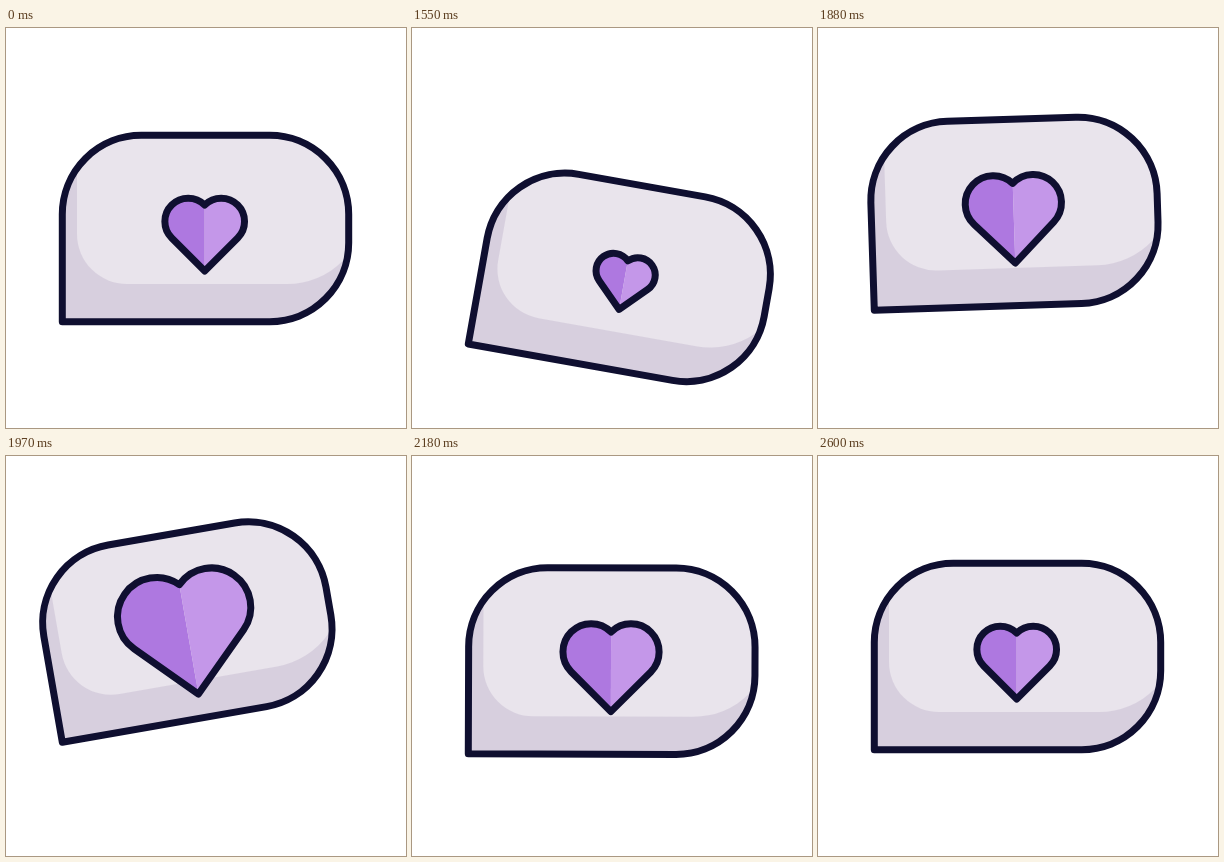
Animation, 400 px wide and 400 px high, one loop 2630 ms. Source, as an HTML page:

```html
<!DOCTYPE html>
<html lang="en">
<head>
<meta charset="utf-8">
<title>Heart message</title>
<style>
  html, body { margin: 0; width: 100%; height: 100%; overflow: hidden; background: #fff; }
  svg { display: block; width: 100vw; height: 100vh; }
  .line { fill: none; stroke: #0f0f30; stroke-width: 7; stroke-linejoin: round; }
</style>
</head>
<body>
<svg viewBox="0 0 400 400">
  <defs>
    <path id="shape" d="M56.3 293.7V186.3A79 79 0 0 1 135.3 107.3H263.7A79 79 0 0 1 342.7 186.3V214.7A79 79 0 0 1 263.7 293.7Z"/>
    <clipPath id="inside"><use href="#shape"/></clipPath>
  </defs>
  <g id="bubble">
    <use href="#shape" fill="#d7cfde"/>
    <path clip-path="url(#inside)" fill="#e9e4ec" d="M71 100V206A50 50 0 0 0 121 256H281A79 79 0 0 0 360 177V100Z"/>
    <use href="#shape" class="line"/>
    <g id="heart">
      <path fill="#ae78e0" d="M0 39L-33 6A23.3 23.3 0 0 1 0 -27Z"/>
      <path fill="#c497e9" d="M0 39L33 6A23.3 23.3 0 0 0 0 -27Z"/>
      <path id="outline" class="line" d="M0 39L-33 6A23.3 23.3 0 0 1 0 -27A23.3 23.3 0 0 1 33 6Z"/>
    </g>
  </g>
</svg>
<script>
const LOOP = 2630, HOLD = 1430, STEP = 30;
const START = 1400, END = 2600;
const $ = id => document.getElementById(id);
const bubble = $('bubble'), heart = $('heart'), outline = $('outline');

// Eased 0 to 1 between two times; launch is the speed at the start
function glide(t, from, to, launch = 0) {
  const u = Math.min(1, Math.max(0, (t - from) / (to - from)));
  return u * u * (3 - 2 * u) + launch * u * (1 - u) ** 2;
}

// Eased 0 to 1 and back to 0
const pulse = (t, from, peak, to, launch) => glide(t, from, peak, launch) - glide(t, peak, to);

const tilt = t =>
  18 * pulse(t, START, 1700, 1980, .5)
  - 10 * pulse(t, 1700, 1980, 2300)
  + 4.9 * pulse(t, 1980, 2300, END);

const drop = t =>
  25 * pulse(t, START, 1600, 1900, 1)
  - 12 * pulse(t, 1600, 1900, 2100)
  + 4.1 * (glide(t, 1900, 2100) - glide(t, 2300, END));

const size = t =>
  1 - .53 * pulse(t, START, 1710, 2025)
  + .79 * pulse(t, 1710, 2025, 2300)
  - .19 * pulse(t, 2025, 2300, END);

function draw(ms) {
  let t = ms % LOOP;
  t = t < HOLD ? 0 : HOLD + Math.floor((t - HOLD) / STEP) * STEP;
  const s = size(t);
  bubble.setAttribute('transform', `translate(0 ${drop(t)}) rotate(${tilt(t)} 56.3 293.7)`);
  heart.setAttribute('transform', `translate(198.7 204) scale(${s})`);
  outline.style.strokeWidth = 7 / s;
}

let start;
function tick(now) {
  start ??= now;
  draw(now - start);
  requestAnimationFrame(tick);
}
draw(0);
requestAnimationFrame(tick);
</script>
</body>
</html>
```
